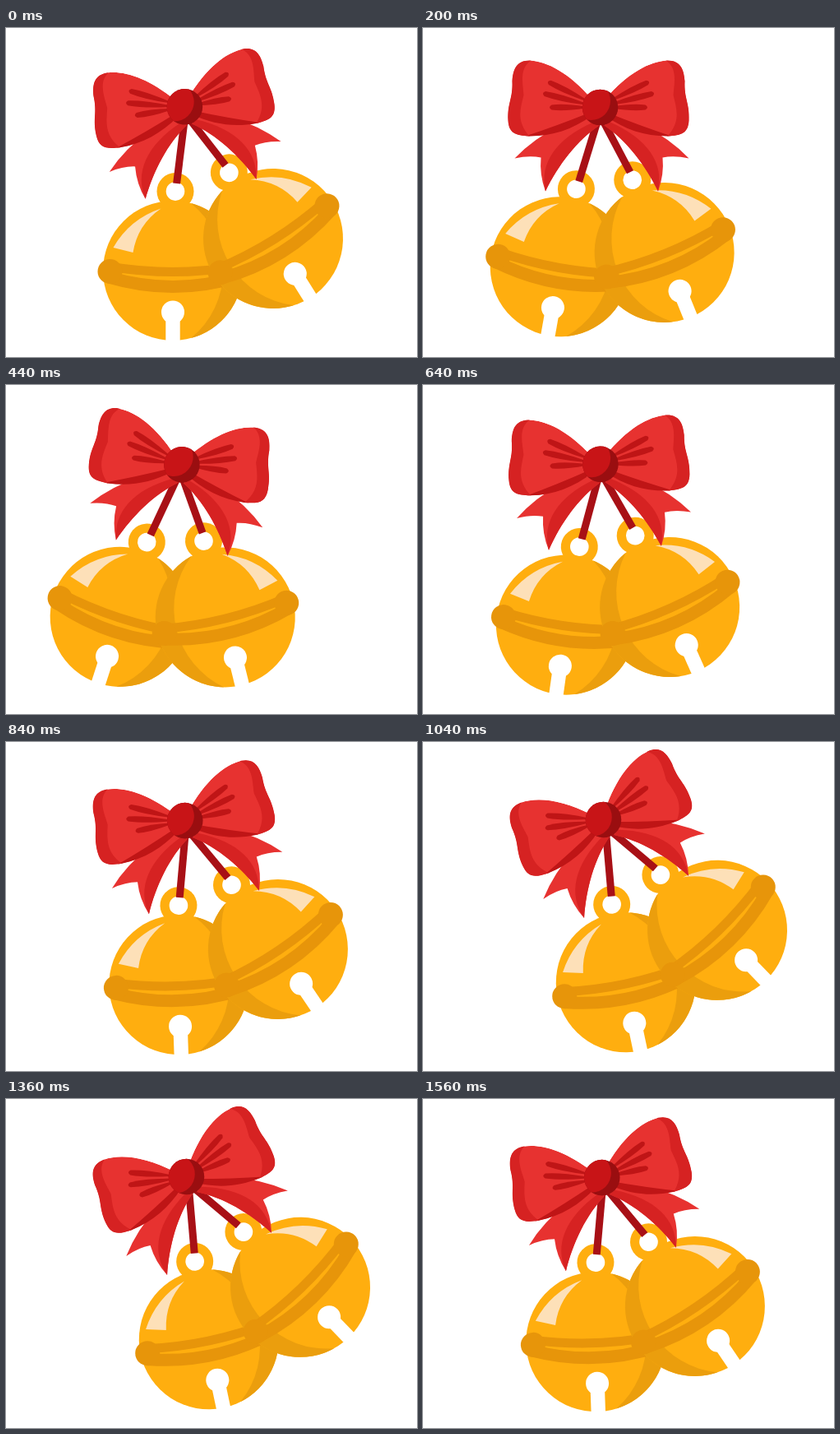
These frames come from a looping animation (500 by 400 pixels, 1.6 s). An HTML page with a canvas:

```html
<!DOCTYPE html>
<html lang="en">
<head>
<meta charset="utf-8">
<title>Jingle bells</title>
<style>
  html, body { margin: 0; width: 100%; height: 100%; overflow: hidden; background: #fff; }
  canvas { display: block; width: 500px; height: 400px; }
</style>
</head>
<body>
<canvas id="stage" width="500" height="400"></canvas>
<script>
const ctx = document.getElementById('stage').getContext('2d');
const LOOP = 1600, STEP = 40, SWING = 20;
const PIVOT = { x: 212.4, y: 85.3 };
const GOLD = '#ffae0f', GOLD_SHADE = '#eb9e0d', BAND = '#e7950a', CREAM = '#fde0b8';
const RED = '#e73230', RED_SHADE = '#d62222', RED_DARK = '#bf1516', STRING = '#a81016';
const rad = deg => deg * Math.PI / 180;

function fill(color, d) {
  ctx.fillStyle = color;
  ctx.fill(new Path2D(d));
}

function stroke(color, width, d) {
  ctx.strokeStyle = color;
  ctx.lineWidth = width;
  ctx.stroke(new Path2D(d));
}

function disc(color, x, y, r) {
  ctx.fillStyle = color;
  ctx.beginPath();
  ctx.arc(x, y, r, 0, 2 * Math.PI);
  ctx.fill();
}

function placed(x, y, deg, flip, draw) {
  ctx.save();
  ctx.translate(x, y);
  ctx.rotate(rad(deg));
  ctx.scale(flip, 1);
  draw();
  ctx.restore();
}

function bell() {
  disc(GOLD, 3, -96.4, 22.5);
  disc('#fff', 3, -96.4, 11.3);
  disc(GOLD, 0, 0, 85);
  fill(GOLD_SHADE, 'M22 -82.1 A85 85 0 0 1 22 82.1 A105.7 105.7 0 0 0 22 -82.1Z');
  fill(CREAM, 'M-72.5 -28 A105 105 0 0 1 -14.5 -75.5 Q-43 -56 -48.5 -22Z');
  stroke(BAND, 11, 'M-78 -5 Q0 8 78 -5');
  stroke(BAND, 15, 'M-78 8 Q0 31 78 8');
  disc(BAND, -76.5, 1, 15);
  disc(BAND, 76.5, 1, 15);
  disc('#fff', 0, 50.5, 14);
  ctx.fillStyle = '#fff';
  ctx.fillRect(-8.7, 52, 17.4, 36);
}

// A fold that tapers toward the knot and ends round.
function fold(x0, y0, x1, y1) {
  const len = Math.hypot(x1 - x0, y1 - y0);
  placed(x0, y0, Math.atan2(y1 - y0, x1 - x0) * 180 / Math.PI, 1, () =>
    fill(RED_DARK, `M0 -1 Q${len * .6} -5 ${len - 2} -3 Q${len + 3} 0 ${len - 2} 3 Q${len * .6} 5 0 1Z`));
}

function tail() {
  fill(RED, 'M3 20 C30 38 53 68 68.5 100 Q76 80 74 59 Q88 56 106 60 Q82 35 50 20 L10 10Z');
  fill(RED_SHADE, 'M3 20 C30 38 53 68 68.5 100 C76 66 56 36 10 16Z');
}

function wing() {
  const outline = new Path2D('M8 -10 C36 -42 62 -56 84 -57 C100 -57 104 -46 105 -32 ' +
    'C104 -10 111 -6 110 16 C109 31 102 34 84 35 C56 35 32 27 8 10Z');
  ctx.save();
  ctx.clip(outline);
  ctx.fillStyle = RED;
  ctx.fill(outline);
  fill(RED_DARK, 'M10 6 Q52 23 92 36 L60 44 L10 20Z');
  fill(RED_SHADE, 'M76 -60 C98 -52 92 -30 91 -15 C95 2 101 18 82 37 L120 40 L120 -60Z');
  ctx.restore();
  fold(16, -9, 61, -31);
  fold(16, -4, 67, -17);
  fold(16, 0, 59, 0);
}

function knot() {
  ctx.save();
  ctx.beginPath();
  ctx.arc(0, 0, 21.8, 0, 2 * Math.PI);
  ctx.clip();
  disc('#9a0e10', 0, 0, 23);
  disc('#c81417', -11, -8, 23.5);
  ctx.restore();
}

function bow() {
  for (const side of [-1, 1]) placed(2, 2, 0, side, tail);
  for (const side of [-1, 1]) placed(-2, 0, 0, side, wing);
  knot();
}

function scene() {
  placed(203, 295, 0, 1, bell);
  placed(325, 256, -32, -1, bell);
  stroke(STRING, 9, 'M218 105 L207.6 189');
  stroke(STRING, 9, 'M219.6 106 L267 167');
  placed(217.4, 95.8, -10, 1, bow);
}

// Constant-speed swing: up to +SWING, down to -SWING, back to zero.
function swingAngle(t) {
  const phase = (t / LOOP + 0.25) % 1;
  return SWING * (1 - 4 * Math.abs(phase - 0.5));
}

let start;
function frame(now) {
  start ??= now;
  const t = Math.floor(((now - start) % LOOP) / STEP) * STEP;
  ctx.fillStyle = '#fff';
  ctx.fillRect(0, 0, 500, 400);
  placed(PIVOT.x, PIVOT.y, swingAngle(t), 1, () => {
    ctx.translate(-PIVOT.x, -PIVOT.y);
    scene();
  });
  requestAnimationFrame(frame);
}
requestAnimationFrame(frame);
</script>
</body>
</html>
```
